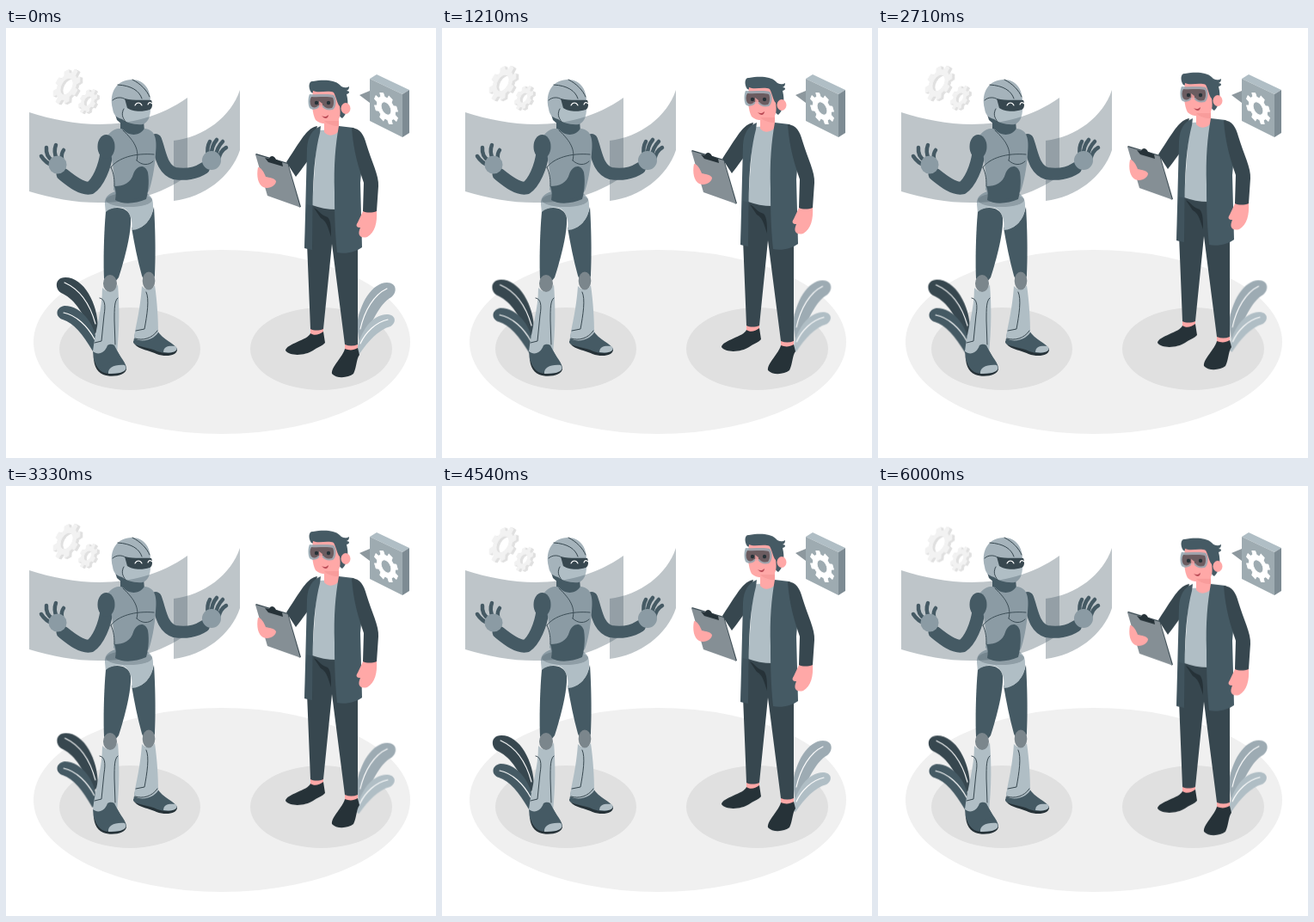
An HTML page that plays this animation: 500 px wide and 500 px high, repeating every 6040 ms.

```html
<!DOCTYPE html>
<html lang="en">
<head>
<meta charset="utf-8">
<title>Robot and engineer</title>
<style>
  html, body { margin: 0; width: 100%; height: 100%; overflow: hidden; background: #fff; }
  svg { display: block; width: 100vw; height: 100vh; }
  #plants { transform-origin: 256px 333px; }
  .ink { fill: #263238; }
  .dark { fill: #37474f; }
  .mid { fill: #455a64; }
  .steel { fill: #8f9ea6; }
  .pale { fill: #b0bec5; }
  .skin { fill: #ffa8a7; }
  .line { fill: none; stroke: #37474f; stroke-width: 1; stroke-linecap: round; stroke-linejoin: round; }
  .vein { fill: none; stroke: #fff; stroke-width: 1.1; stroke-linecap: round; }
  .limb { fill: none; stroke: #455a64; stroke-linecap: round; stroke-linejoin: round; }
  .glass { fill: #455a64; fill-opacity: .35; }
</style>
</head>
<body>
<svg viewBox="0 0 500 500">
  <g id="floor">
    <ellipse cx="251" cy="365" rx="219" ry="107" fill="#f0f0f0"/>
    <ellipse cx="144" cy="373" rx="82" ry="48" fill="#e0e0e0"/>
    <ellipse cx="366.500" cy="373" rx="82.500" ry="48" fill="#e0e0e0"/>
  </g>

  <g id="plants">
    <path class="dark" d="M107 352C108 322 91 290 69 290C57 290 56 303 64 308C78 314 89 328 101 358Z"/>
    <path class="vein" d="M68 296C86 304 98 322 104 344"/>
    <path class="mid" d="M106 374C107 348 89 323 68 323C57 325 57 336 66 339C79 343 89 356 101 376Z"/>
    <path class="vein" d="M67 331C82 334 95 347 103 362"/>
    <path fill="#9dabb3" d="M408 346C411 320 426 296 443 296C455 296 455 308 448 313C435 320 424 342 412 374Z"/>
    <path class="vein" d="M443 303C428 310 417 328 412 350"/>
    <path class="pale" d="M408 377C411 352 427 332 444 333C454 334 454 343 447 347C433 351 422 363 411 379Z"/>
    <path class="vein" d="M444 339C430 342 418 354 412 367"/>
  </g>

  <g id="robot">
    <!-- right leg -->
    <path class="ink" d="M148 364C150 373 164 374 175 379C186 383 199 381 199 374L190 372Z"/>
    <path class="mid" d="M150 355C157 360 168 358 176 352C182 362 196 367 199 373C197 379 184 379 176 376C166 371 152 371 148 366Z"/>
    <path class="pale" d="M183 377C183 370 190 369 197 370C201 374 197 379 183 377Z"/>
    <path class="pale" d="M158 300C163 306 170 305 173 299C176 320 177 340 177 354C171 363 158 366 149 361C150 349 156 330 158 300Z"/>
    <path class="line" d="M163 307C167 315 164 334 161 350L151 352M176 352C170 361 159 364 150 361"/>
    <path class="mid" d="M146 232C157 236 168 226 172 208C174 238 174 270 173 288C170 297 162 298 158 288C153 270 149 250 146 232Z"/>
    <ellipse cx="166" cy="294" rx="7.300" ry="10.500" fill="#7b868c"/>

    <!-- left leg -->
    <path class="ink" d="M102 378C101 390 105 400 113 403C123 407 140 404 140 396Z"/>
    <path class="mid" d="M103 367C109 373 118 371 126 367C128 378 139 387 140 395C138 402 122 404 112 400C104 395 102 386 102 378Z"/>
    <path class="pale" d="M119 402C118 395 126 391 138 392C142 398 137 402 119 402Z"/>
    <path class="pale" d="M112 302C118 309 126 307 130 298C132 322 132 350 129 378C124 384 108 384 101 376C104 350 112 328 112 302Z"/>
    <path class="mid" d="M101 376C107 381 115 378 118 369C121 367 126 367 127 371L134 384L110 394L102 386Z"/>
    <path class="line" d="M109 314C115 315 116 322 114 334L111 364L103 366M130 314C126 317 126 326 126 340L127 368"/>
    <path class="pale" d="M115 205C114 192 128 188 143 188C162 188 172 194 171 207C172 222 158 235 146 235C148 224 144 210 134 209C126 208 119 210 116 216Z"/>
    <ellipse cx="143" cy="200" rx="27" ry="8" class="steel"/>
    <path class="mid" d="M116 214C124 206 143 207 145 221C146 238 138 268 131 290C126 298 117 298 114 291C113 270 114 235 116 214Z"/>
    <ellipse cx="121" cy="297" rx="8" ry="10" fill="#7b868c"/>

    <!-- arms -->
    <path class="limb" stroke-width="15" d="M117 145C115 162 107 180 98 186C88 188 76 178 66 170"/>
    <path class="limb" stroke-width="14" d="M174 130C180 146 181 164 196 169C208 171 221 169 230 163"/>
    <path class="limb" stroke-width="4.500" d="M55 160Q46 157 41 149M54 154Q46 149 47 139M59 152Q55 144 58 136M65 152Q64 146 67 142"/>
    <circle class="pale" cx="60" cy="159" r="10.500"/>
    <path class="limb" stroke-width="4.500" d="M235 148Q233 139 237 132M239 147Q239 137 245 130M244 149Q245 139 252 132M247 153Q249 143 256 139"/>
    <circle class="pale" cx="239" cy="154" r="11"/>

    <!-- torso -->
    <path class="mid" d="M133 104L160 108L161 120C154 127 142 126 133 119Z"/>
    <path class="pale" d="M119 124C125 116 134 116 136 118C143 126 155 126 161 117C173 118 176 128 174 146C173 164 169 182 166 190C154 201 134 201 125 188C128 172 122 150 119 124Z"/>
    <path class="mid" d="M126 184C137 184 145 180 148 170C152 159 162 158 165 168C167 180 165 192 163 199C150 205 134 205 127 200C128 194 128 190 126 184Z"/>
    <ellipse class="mid" cx="116.500" cy="138" rx="10" ry="14"/>
    <path class="line" d="M122 162C130 151 150 145 172 147M136 119C150 132 155 142 152 154M152 154C158 160 166 160 171 155M122 162C126 170 126 178 126 184"/>

    <!-- head -->
    <path class="mid" d="M125 94L129 107L136 113L146 109Z"/>
    <path fill="#a5b3bb" d="M124 94C119 74 130 60 146 60C162 60 169 73 168 89C168 99 164 108 158 111C150 112 140 110 135 106C128 104 125 101 124 94Z"/>
    <path class="pale" d="M138 92C148 97 160 97 168 94C168 103 165 110 159 112C150 113 138 110 135 105Z"/>
    <path class="dark" d="M138 82C150 85 162 83 169 84C171 89 170 94 167 95C158 98 146 97 141 93Z"/>
    <path class="line" d="M130 66C146 67 155 73 158 82M147 60C157 65 164 73 167 80M124 84C128 80 135 80 139 83M137 94C134 99 135 104 139 109"/>
    <path class="vein" d="M150 90C152 86 156 86 158 90M165 89C166 86 168 86 170 88"/>
  </g>

  <g id="screens">
    <path class="glass" d="M27 98C85 117 155 121 211 81V172C155 212 85 208 27 190Z"/>
    <path class="glass" d="M195 131C230 127 262 103 272 72V142C262 173 230 197 195 201Z"/>
  </g>

  <g id="cogs"></g>

  <g id="bubble">
    <path fill="#8d989e" d="M423 73L411 78L423 87Z"/>
    <path fill="#b0bec5" d="M423 59L431 54L469 72L461 77Z"/>
    <path fill="#7d8b93" d="M461 77L469 72V122L461 127Z"/>
    <path fill="#9eabb1" d="M423 59L461 77V127L423 108Z"/>
  </g>

  <g id="man">
    <!-- legs -->
    <path class="skin" d="M354 347H369V357H354ZM394 365H409V375H394Z"/>
    <path class="ink" d="M354 355C351 363 326 367 325 375C330 382 348 381 357 375C362 371 368 370 371 366L369 353C364 357 358 358 354 355Z"/>
    <path class="ink" d="M394 373C392 382 378 394 379 402C384 408 398 407 404 402C408 394 407 386 411 380L409 372C404 375 399 375 394 373Z"/>
    <path class="dark" d="M356 205L384 209L409 250L409 368C404 370 399 370 394 368L379 251L369 350C364 352 358 352 354 350L350 250Z"/>
    <path class="ink" d="M358 209C364 212 365 217 374 220C378 224 378 233 378 243C374 230 372 224 366 221Z"/>

    <!-- clothes -->
    <path class="dark" d="M362 114C350 117 347 124 326 156L337 173C342 167 348 158 354 150Z"/>
    <path class="pale" d="M362 119L390 118L384 211C374 211 364 209 356 206Z"/>
    <path class="skin" d="M370 102H387V120C382 126 374 126 370 121Z"/>
    <path class="mid" d="M366 114C356 118 351 126 350 140L347 256L356 258C357 212 355 160 365 122Z"/>
    <path class="dark" d="M350 205L347 256L356 258L357 207Z" opacity=".35"/>
    <path class="mid" d="M387 114L404 116C413 122 416 145 412 180L414 255C406 261 394 263 385 261C382 232 382 207 382 190C381 160 383 136 387 114Z"/>
    <path class="skin" d="M416 211L431 212C432 226 429 238 420 243C412 245 408 241 412 232C408 232 406 230 409 226Z"/>
    <path class="dark" d="M402 116C412 117 416 124 419 135C425 155 434 172 433 184L431 213C426 215 419 215 415 213L416 180C410 162 404 144 402 116Z"/>

    <!-- clipboard -->
    <path class="dark" d="M290 147L291 146L328 157L343 208L341 208.500Z"/>
    <path fill="#858f95" d="M290 147L327.500 158L342 208.500L304 195Z"/>
    <path class="ink" d="M301 151L306 152C307 148 312 148 314 153L321 156L322 161L305 156Z"/>
    <path class="skin" d="M293 162C291 172 293 182 299 185C306 188 314 183 314 178C312 174 306 174 302 173C300 168 297 162 293 162Z"/>

    <!-- head -->
    <path class="mid" d="M355 75C351 69 352 61 357 62C368 60 382 60 388 66C391 70 396 70 399 68C399 71 398 72 396 73C400 73 400 76 396 77C399 88 397 100 391 105C386 102 384 95 384 86Z"/>
    <path class="skin" d="M357 73C363 76 375 72 381 75C384 80 385 88 388 91C389 98 389 104 386 107C378 112 366 113 360 107C356 100 355 86 357 73Z"/>
    <ellipse class="skin" cx="395" cy="93.500" rx="5.500" ry="6.500"/>
    <path fill="#f28f8f" d="M370 108H387V114C381 114 374 112 370 108Z" opacity=".5"/>
    <path class="line" stroke-width="1.500" d="M358 83L363 81M371 81L378 82"/>
    <path fill="#90a4ae" opacity=".85" d="M353 77C362 78 374 76 381 78C385 82 384 93 380 95C374 96 371 95 368 92L364 92C361 95 356 96 353 93C351 89 351 81 353 77Z"/>
    <path fill="#6b5c60" d="M355 80C363 81 373 79 380 81C382 85 381 91 379 93C374 94 371 93 369 90L363 90C361 93 357 93 355 91C353 88 353 83 355 80Z"/>
    <circle class="ink" cx="361" cy="87" r="2.200"/>
    <circle class="ink" cx="375" cy="87" r="2.200"/>
    <path fill="#ffa8a7" d="M364 85C365 89 363 93 364 96L368 96L368 88Z" opacity=".8"/>
    <path fill="#b94a55" d="M367 102C370 104 373 103 375 101C375 105 371 107 367 102Z"/>
  </g>
</svg>
<script>
  const $ = id => document.getElementById(id);
  const NS = 'http://www.w3.org/2000/svg';
  const LOOP = 6040;

  // Cog outline with tapered teeth and a round hole, centred on 0,0; phase is in teeth.
  function cogPath(r, teeth, hole, phase) {
    const pts = [];
    for (let i = 0; i < teeth; i++) {
      for (const [f, k] of [[-.3, .76], [-.2, 1], [.2, 1], [.3, .76]]) {
        const a = (i + f + phase) / teeth * Math.PI * 2;
        pts.push((Math.cos(a) * r * k).toFixed(2) + ' ' + (Math.sin(a) * r * k).toFixed(2));
      }
    }
    return `M${pts.join('L')}ZM${hole} 0A${hole} ${hole} 0 1 0 ${-hole} 0A${hole} ${hole} 0 1 0 ${hole} 0Z`;
  }

  function addCog(parent, x, y, r, hole, tilt, fill, phase = 0) {
    const p = document.createElementNS(NS, 'path');
    p.setAttribute('d', cogPath(r, 8, hole, phase));
    p.setAttribute('transform', `matrix(.84 ${tilt} 0 1 ${x} ${y})`);
    p.setAttribute('fill', fill);
    p.setAttribute('fill-rule', 'evenodd');
    p.setAttribute('stroke', fill);
    p.setAttribute('stroke-linejoin', 'round');
    parent.append(p);
  }

  for (const [x, y, r, hole] of [[70.5, 68, 18.5, 9], [95, 85, 12.5, 5.5]]) {
    for (const d of [3, 2, 1]) addCog($('cogs'), x + d, y + d * .4, r, hole, -.45, '#e0e0e0');
    addCog($('cogs'), x, y, r, hole, -.45, '#f2f2f2');
  }
  addCog($('bubble'), 442, 93.5, 16.5, 7, .45, '#fff', .5);

  const float = [0, -10, 0].map(y => ({ transform: `translateY(${y}px)` }));
  const sway = [[0, 0], [.25, 1], [.75, -1], [1, 0]]
    .map(([offset, deg]) => ({ offset, transform: `rotate(${deg}deg)` }));

  for (const [id, steps, duration] of [
    ['man', float, LOOP],
    ['cogs', float, LOOP / 4],
    ['plants', sway, LOOP / 4],
  ]) $(id).animate(steps, { duration, iterations: Infinity });
</script>
</body>
</html>
```
